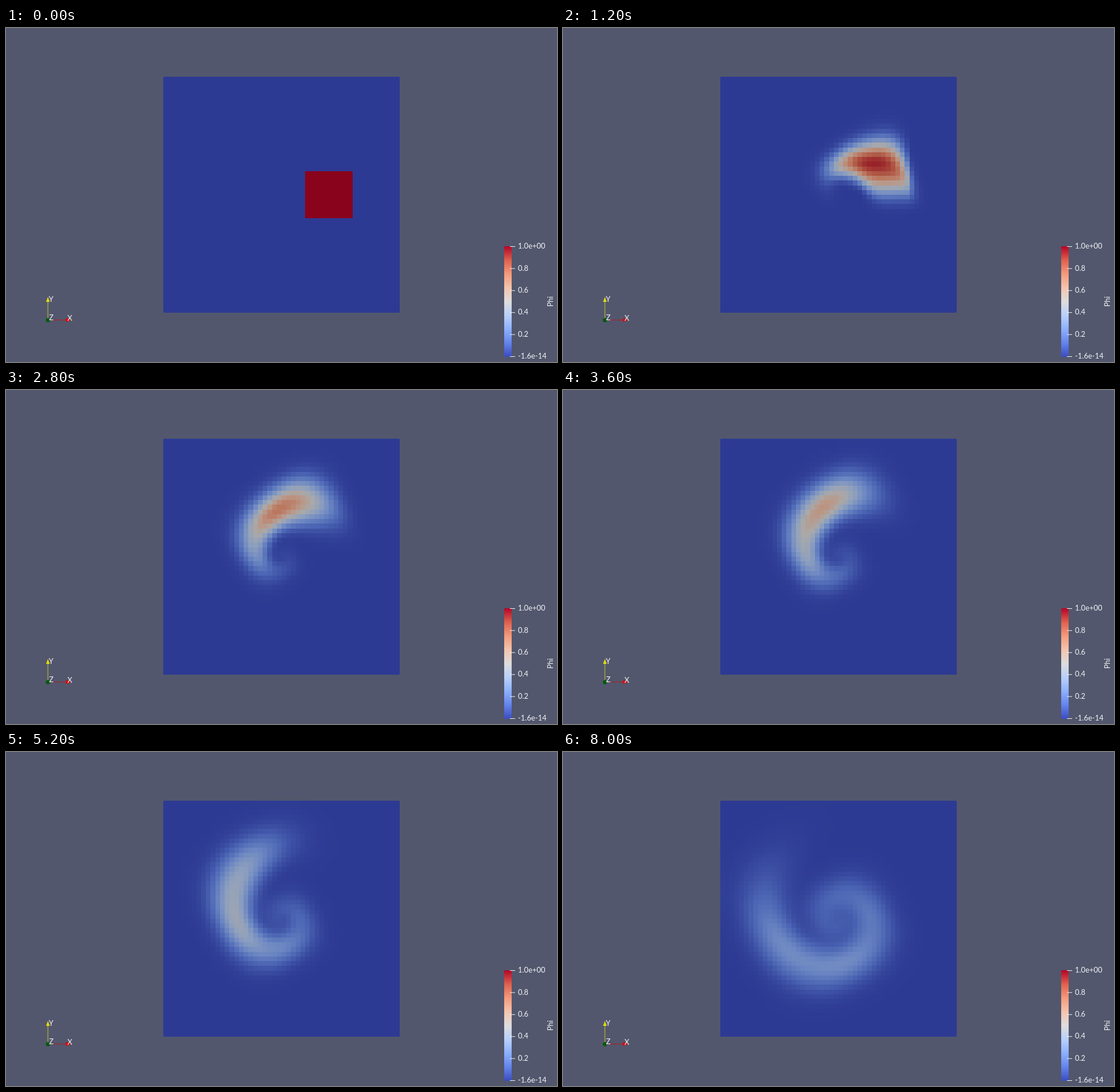
Write an HTML page with a canvas that moves like this. It is 960 px wide and 583 px high and loops after 8.2 s.

```html
<!DOCTYPE html>
<html lang="en">
<head>
<meta charset="utf-8">
<title>Phi in a rotating flow</title>
<style>
  html, body { margin: 0; width: 100%; height: 100%; overflow: hidden; background: #52576d; }
  #stage { position: absolute; left: 0; top: 0; width: 960px; height: 583px; overflow: hidden; }
  #field { position: absolute; left: 274px; top: 85px; width: 412px; height: 412px;
           border-radius: 2px; image-rendering: pixelated; }
  svg { position: absolute; left: 0; top: 0; }
  text { font-family: Lato, "Open Sans", sans-serif; font-size: 13px; fill: #f2f2f4; }
</style>
</head>
<body>
<div id="stage">
  <canvas id="field" width="50" height="50"></canvas>
  <svg width="960" height="583" viewBox="0 0 960 583">
    <defs><linearGradient id="bar" x1="0" y1="1" x2="0" y2="0"></linearGradient></defs>
    <g id="axes">
      <path d="M73 508V477" stroke="#b9b52c" stroke-width="1.2"/>
      <path d="M73 469.5l3.2 8.5h-6.4z" fill="#e2de0c"/>
      <path d="M76 509.7H105" stroke="#a8222c" stroke-width="1.2"/>
      <path d="M113.5 509.7l-9 -3.6v7.2z" fill="#dc0808"/>
      <circle cx="73" cy="510" r="3.7" fill="#07590f"/>
      <text x="74.5" y="478">Y</text>
      <text x="75" y="510">Z</text>
      <text x="107" y="510.5">X</text>
    </g>
    <g id="legend">
      <rect x="868" y="381" width="13" height="193" fill="url(#bar)"/>
      <text transform="translate(953 486.5) rotate(-90)">Phi</text>
    </g>
  </svg>
</div>
<script>
const N = 50, FRAMES = 41, HOLD = 200;
const CELLS_PER_FRAME = 1.2, SUBSTEPS = 24;
const SHADE = 0.765;

// Diverging cool-to-warm map, evenly spaced stops
const STOPS = [
  [59, 76, 192], [99, 132, 235], [141, 176, 254], [184, 208, 249], [221, 221, 221],
  [245, 196, 173], [244, 154, 123], [222, 96, 77], [180, 4, 38]
];

function coolWarm(v) {
  const p = Math.min(1, Math.max(0, v)) * (STOPS.length - 1);
  const k = Math.min(STOPS.length - 2, Math.floor(p));
  return STOPS[k].map((c, n) => c + (STOPS[k + 1][n] - c) * (p - k));
}

function svgEl(parent, name, attrs, text = '') {
  const el = document.createElementNS('http://www.w3.org/2000/svg', name);
  for (const key in attrs) el.setAttribute(key, attrs[key]);
  el.textContent = text;
  parent.appendChild(el);
}

function buildLegend() {
  const bar = document.getElementById('bar');
  STOPS.forEach((c, k) => svgEl(bar, 'stop', {
    offset: k / (STOPS.length - 1), 'stop-color': `rgb(${c})`
  }));
  const legend = document.getElementById('legend');
  ['1.0e+00', '0.8', '0.6', '0.4', '0.2', '-1.6e-14'].forEach((label, k) => {
    const y = 381.5 + k * 38.4;
    svgEl(legend, 'path', { d: `M878 ${y}H887`, stroke: '#f2f2f4' });
    svgEl(legend, 'text', { x: 892, y: y + 3.7 }, label);
  });
}

// Face velocities of a unit-speed counterclockwise flow around the centre
const uFace = new Float64Array(N * N), vFace = new Float64Array(N * N);
for (let j = 0; j < N; j++) {
  for (let i = 0; i < N; i++) {
    const x = i - N / 2, y = N / 2 - j;
    uFace[j * N + i] = -(y - 0.5) / Math.hypot(x, y - 0.5);
    vFace[j * N + i] = (x + 0.5) / Math.hypot(x + 0.5, y);
  }
}

// One first-order upwind step of phi
function advect(phi, dt) {
  const next = phi.slice();
  const move = (from, to, speed) => {
    const amount = dt * speed * phi[speed > 0 ? from : to];
    next[from] -= amount;
    next[to] += amount;
  };
  for (let j = 0; j < N; j++) {
    for (let i = 0; i < N; i++) {
      const c = j * N + i;
      if (i) move(c - 1, c, uFace[c]);
      if (j) move(c, c - N, vFace[c]);
    }
  }
  return next;
}

function simulate() {
  let phi = new Float64Array(N * N);
  for (let j = 20; j < 30; j++) phi.fill(1, j * N + 30, j * N + 40);
  const states = [phi];
  while (states.length < FRAMES) {
    for (let s = 0; s < SUBSTEPS; s++) phi = advect(phi, CELLS_PER_FRAME / SUBSTEPS);
    states.push(phi);
  }
  return states;
}

const ctx = document.getElementById('field').getContext('2d');
const image = ctx.createImageData(N, N);

function paint(phi) {
  phi.forEach((v, c) => {
    const [r, g, b] = coolWarm(v);
    image.data.set([r * SHADE, g * SHADE, b * SHADE, 255], c * 4);
  });
  ctx.putImageData(image, 0, 0);
}

buildLegend();
const states = simulate();
const start = performance.now();
let shown = -1;

function tick() {
  const k = Math.floor((performance.now() - start) / HOLD) % FRAMES;
  if (k !== shown) paint(states[shown = k]);
  requestAnimationFrame(tick);
}
tick();
</script>
</body>
</html>
```
